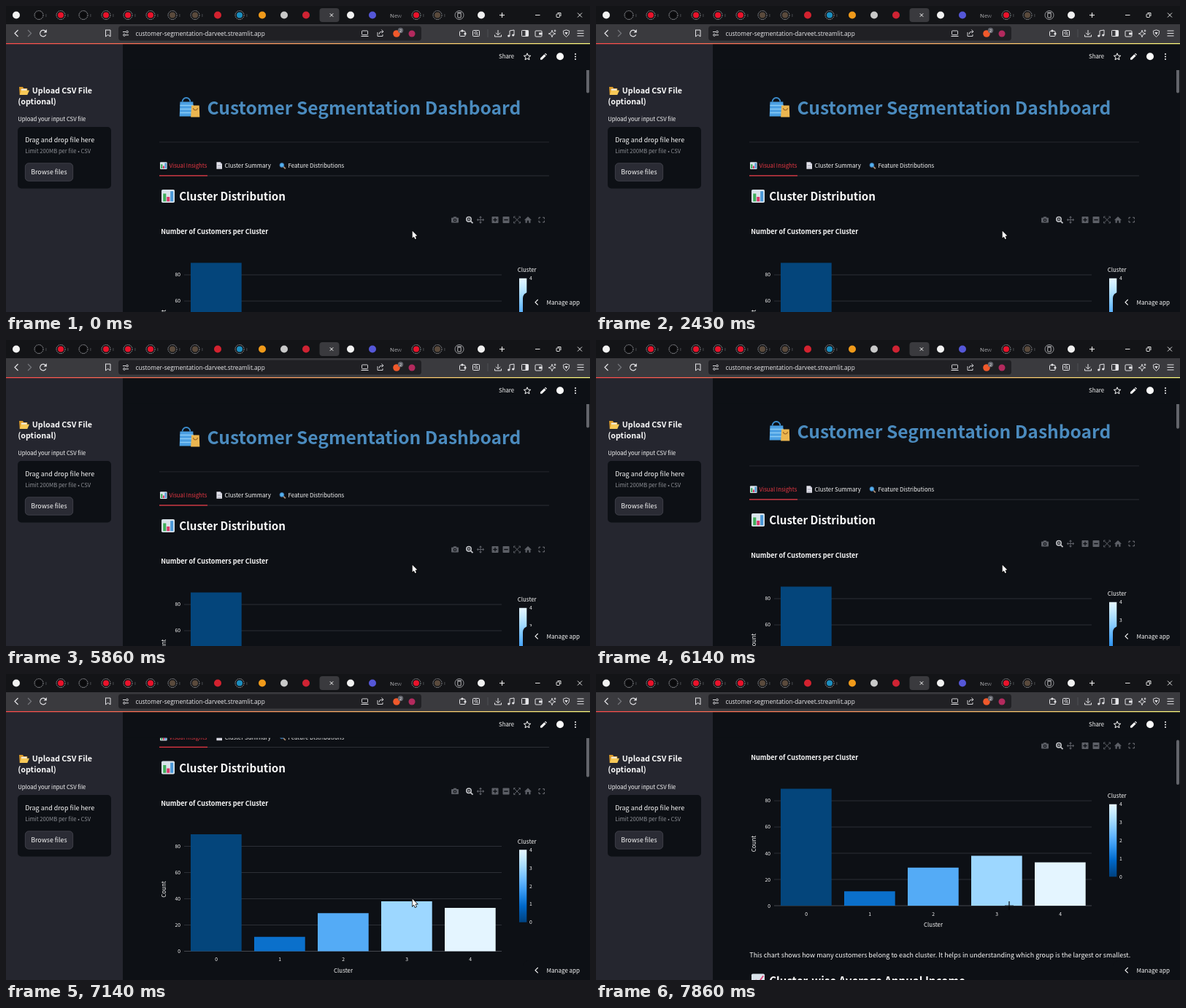
These frames come from a looping animation (800x420 px, 8 s). An HTML page with a canvas:

```html
<!DOCTYPE html>
<html lang="en">
<head>
<meta charset="utf-8">
<title>Customer Segmentation Dashboard</title>
<style>
html, body { margin: 0; width: 100%; height: 100%; overflow: hidden; background: #0d1015; }
canvas { display: block; width: 800px; height: 420px; }
</style>
</head>
<body>
<canvas id="stage"></canvas>
<script>
const LOOP = 8000;
const SANS = '"Noto Sans CJK JP", "Noto Sans CJK SC", "Noto Sans CJK", "Noto Sans", sans-serif';
const UI = '"Open Sans", "Noto Sans", sans-serif';
const BG = '#0d1015', SIDE = '#25262f', WHITE = '#fafafa', DIM = '#5c5f66', RED = '#ea3844';
const STRIP = '#131417', TOOLBAR = '#3a3a3e', FIELD = '#202024', GRID = '#2c2f36';
const BLUES = ['#004280', '#0054a3', '#0068c9', '#1c83e1', '#3d9df3', '#60b4ff', '#83c9ff', '#a6dcff', '#c7ebff', '#e4f5ff'];
const BARS = [[89, '#04457b'], [11, '#0b70cb'], [29, '#54abf6'], [38, '#9dd7ff'], [33, '#e4f5ff']];

// [start in ms, scroll in px]
const SCROLL = [[0, 0], [5710, 2], [5860, 6], [6000, 10], [6140, 14], [6290, 17], [6430, 19],
  [6710, 20], [7000, 77], [7140, 132.5], [7290, 143], [7860, 195]];

const stage = document.getElementById('stage');
const g = stage.getContext('2d');
const ratio = window.devicePixelRatio || 1;
stage.width = 800 * ratio;
stage.height = 420 * ratio;

function text(s, x, y, size, color = WHITE, weight = 400, align = 'left', font = SANS) {
  g.font = `${weight} ${size}px ${font}`;
  g.fillStyle = color;
  g.textAlign = align;
  g.fillText(s, x, y);
}
function rect(x, y, w, h, color, r = 0) {
  g.fillStyle = color;
  g.beginPath();
  g.roundRect(x, y, w, h, r);
  g.fill();
}
function frame(x, y, w, h, color, r = 0, lw = 1) {
  g.strokeStyle = color;
  g.lineWidth = lw;
  g.beginPath();
  g.roundRect(x, y, w, h, r);
  g.stroke();
}
function disc(x, y, r, color) {
  g.fillStyle = color;
  g.beginPath();
  g.arc(x, y, r, 0, 7);
  g.fill();
}
function arc(x, y, r, color, lw = 1, from = 0, to = Math.PI * 2) {
  g.strokeStyle = color;
  g.lineWidth = lw;
  g.beginPath();
  g.arc(x, y, r, from, to);
  g.stroke();
}
function path(pts) {
  g.beginPath();
  for (let i = 0; i < pts.length; i += 2) g.lineTo(pts[i], pts[i + 1]);
}
function line(pts, color, lw = 1) {
  path(pts);
  g.strokeStyle = color;
  g.lineWidth = lw;
  g.stroke();
}
function poly(pts, color) {
  path(pts);
  g.fillStyle = color;
  g.fill();
}
function at(x, y, scale, draw) {
  g.save();
  g.translate(x, y);
  g.scale(scale, scale);
  draw();
  g.restore();
}
function gradient(x0, y0, x1, y1, colors) {
  const fill = g.createLinearGradient(x0, y0, x1, y1);
  colors.forEach((c, i) => fill.addColorStop(i / (colors.length - 1), c));
  return fill;
}
function star(x, y, outer, inner, points) {
  const pts = [];
  for (let i = 0; i <= points * 2; i++) {
    const r = i % 2 ? inner : outer, a = i * Math.PI / points - Math.PI / 2;
    pts.push(x + r * Math.cos(a), y + r * Math.sin(a));
  }
  return pts;
}

// Emoji-like pictures on a 20 px grid
function barsPicture() {
  rect(0, 0, 20, 20, '#d9e3ea', 2);
  rect(2.5, 6, 4.5, 12, '#3fae5a');
  rect(8, 11, 4.5, 7, '#d83a6c');
  rect(13.5, 2.5, 4.5, 15.5, '#4a98d8');
}
function trendPicture() {
  rect(0, 0, 20, 20, '#d9e3ea', 2);
  line([2, 16, 7, 10, 11, 13, 18, 3], '#e0457b', 2);
}
function pagePicture() {
  poly([2, 0, 13, 0, 18, 5, 18, 20, 2, 20], '#e4e4ec');
  poly([13, 0, 18, 5, 13, 5], '#a9a9bd');
  for (const y of [8, 11, 14, 17]) rect(5, y, 10, 1, '#9a9aae');
}
function lensPicture() {
  line([12, 12, 19, 19], '#a98a70', 4);
  disc(8, 8, 6.5, '#54b1ee');
  arc(8, 8, 6.5, '#3a6ea5', 2);
}
function folderPicture() {
  poly([0, 2, 7, 2, 9, 5, 16, 5, 16, 17, 1, 17], '#dc9a28');
  rect(4, 6, 11, 6, '#f0eee4');
  poly([4, 9, 20, 9, 16, 18, 1, 18], '#f8c957');
}
function bagsPicture() {
  arc(7, 4.5, 3.8, '#3b8ccc', 1.3, Math.PI, 0);
  poly([1, 4.5, 13.5, 4.5, 14, 18.5, 0.5, 18.5], '#4a9fe2');
  for (const y of [7.5, 11, 14.5]) rect(1, y, 12.8, 1.1, '#8accf5');
  poly([12, 8, 19.4, 8, 19.8, 19.3, 11.3, 19.3], '#ebb650');
  arc(15.7, 10.5, 2, '#a06a24', 0.8, 0, Math.PI);
}

function tabs() {
  rect(0, 0, 800, 25, STRIP);
  rect(429.5, 3, 27, 19, TOOLBAR, 4);
  // centre, colour, sleeping
  const icons = [[14, '#f2f2f2', 0], [45, '#0a0a0c', 1], [75, '#e8132b', 1], [106, '#0a0a0c', 1], [137, '#e8132b', 1],
    [167, '#e8132b', 1], [198, '#e8132b', 1], [228, '#5a4a3c', 1], [259, '#5a4a3c', 1], [290, '#d3222f', 0],
    [320, '#1d8fc0', 1], [351, '#f09a1a', 0], [381, '#c9c9c9', 0], [411, '#cf2333', 0], [472, '#f2f2f2', 0],
    [502, '#5557d8', 0], [562, '#e8132b', 1], [591, '#5a4a3c', 1], [651, '#f0f0f0', 0]];
  for (const [x, color, asleep] of icons) {
    disc(x, 12.5, asleep ? 4 : 5, color);
    if (!asleep) continue;
    g.setLineDash([1.6, 0.8]);
    arc(x, 12.5, 6, '#a2a3a8', 0.9);
    g.setLineDash([]);
    rect(x + 9.5, 11, 0.8, 4, '#55575d');
  }
  arc(621, 12.5, 6, '#a2a3a8', 0.9);
  frame(618.8, 10, 4.4, 6, '#d0d0d2', 0.5, 0.9);
  line([618, 9, 624, 9], '#d0d0d2');
  text('New', 526, 15.5, 7.8, gradient(526, 0, 543, 0, ['#dddddf', '#5a5b60']), 400, 'left', UI);
  line([443.8, 10.3, 448.2, 14.7], WHITE);
  line([448.2, 10.3, 443.8, 14.7], WHITE);
  line([676, 12.5, 683, 12.5], WHITE);
  line([679.5, 9, 679.5, 16], WHITE);
  line([725, 12.5, 731.5, 12.5], WHITE, 0.9);
  frame(754, 11, 4.5, 4.5, WHITE, 0.8, 0.9);
  line([755.5, 9.5, 760, 9.5, 760, 14], WHITE, 0.9);
  line([783, 9.5, 789, 15.5], WHITE, 0.9);
  line([789, 9.5, 783, 15.5], WHITE, 0.9);
}

function toolbar() {
  const c = '#e4e4e7';
  rect(0, 25, 800, 27, TOOLBAR);
  rect(154, 27.5, 415, 20, FIELD, 4);
  line([16.5, 33, 12, 37.5, 16.5, 42], c, 1.2);
  line([30, 33, 34.5, 37.5, 30, 42], '#77787d', 1.2);
  arc(51, 37.5, 4.3, c, 1.2, 0.5, 5.6);
  poly([55.8, 32, 55.8, 36.4, 51.6, 36.4], c);
  line([136.5, 33, 143, 33, 143, 42, 139.7, 39.5, 136.5, 42, 136.5, 32.6], c);
  line([160, 35.5, 164, 35.5], c);
  arc(166, 35.5, 1.4, c, 0.9);
  line([164, 39.8, 168, 39.8], c);
  arc(162, 39.8, 1.4, c, 0.9);
  text('customer-segmentation-darveet.streamlit.app', 177.5, 40.8, 8.25, '#ececef', 400, 'left', UI);
  frame(487.5, 34, 8, 5.5, c, 0.8, 0.9);
  line([486.5, 41.5, 496.5, 41.5], c);
  line([509, 36, 509, 41.5, 516, 41.5, 516, 39], c, 0.9);
  line([511, 39, 512, 36, 516.5, 35], c, 0.9);
  line([514.3, 32.7, 517, 35, 514.8, 37.4], c, 0.9);
  disc(535, 38, 4.8, '#f0592b');
  disc(540.5, 33.5, 3.7, '#63656d');
  text('2', 540.5, 35.6, 5.5, WHITE, 400, 'center', UI);
  disc(556, 38, 4.5, '#b32a5e');
  frame(621.5, 34.5, 7.5, 7, c, 1);
  disc(625, 34, 1.6, c);
  disc(629, 38, 1.6, c);
  frame(639.5, 33.5, 9, 8, c, 1);
  arc(643.7, 37, 1.7, c, 0.9);
  line([645, 38.3, 646.7, 40], c);
  line([660, 32, 660, 43], '#55565b', 0.8);
  line([674, 33, 674, 39.5], c);
  line([671, 36.8, 674, 39.8, 677, 36.8], c);
  line([669.5, 39.5, 669.5, 42, 678.5, 42, 678.5, 39.5], c);
  line([690, 41, 690, 34, 696, 33, 696, 40], c);
  disc(688.7, 41, 1.6, c);
  disc(694.7, 40, 1.6, c);
  frame(706.5, 33.5, 9, 8, c, 0.8);
  rect(711.5, 33.5, 4, 8, c);
  frame(725, 34, 9, 8, c, 1);
  rect(730, 36.5, 4.5, 3, c, 0.8);
  line(star(748, 38, 4.8, 1.8, 4), c, 0.9);
  poly(star(752, 34, 2.2, 0.8, 4), c);
  line([767.5, 32.8, 771.7, 34.2, 771, 39, 767.5, 42.5, 764, 39, 763.3, 34.2, 767.5, 32.8], c, 0.9);
  poly([765.3, 36, 769.7, 36, 767.5, 39.5], c);
  for (const y of [34, 37.5, 41]) line([782.5, y, 791.5, y], c);
}

function sidebar() {
  rect(0, 52, 160, 368, SIDE);
  at(18, 109.5, 0.7, folderPicture);
  text('Upload CSV File', 35.7, 120, 10.75, WHITE, 600);
  text('(optional)', 16.2, 135, 10.75, WHITE, 600);
  text('Upload your input CSV file', 16.2, 158, 7.7);
  rect(16, 166, 128, 84.5, BG, 5);
  text('Drag and drop file here', 26.2, 187, 8.95);
  text('Limit 200MB per file • CSV', 26.2, 202, 7.65, '#8e9096');
  rect(26, 215.5, 66, 25, '#2a2b34', 5);
  frame(26.3, 215.8, 65.4, 24.4, '#46474f', 5, 0.7);
  text('Browse files', 34.2, 231, 8.85);
}

function header() {
  rect(160, 52, 640, 35.5, BG);
  text('Share', 675, 72.2, 7.85);
  line(star(714, 69.8, 5, 2.2, 5), WHITE, 1);
  poly([732, 73.8, 732, 71.6, 737.4, 66.2, 739.6, 68.4, 734.2, 73.8], WHITE);
  poly([738, 65.6, 739, 64.8, 741, 66.8, 740.2, 67.8], WHITE);
  disc(759, 69.3, 5, WHITE);
  for (const y of [66, 69.5, 73]) disc(780, y, 1, WHITE);
}

function modebar(y) {
  rect(610, y - 3, 10, 7, DIM, 1);
  rect(613, y - 4.3, 4, 2, DIM);
  disc(615, y + 0.4, 2.2, BG);
  disc(615, y + 0.4, 1.2, DIM);
  arc(634, y - 0.7, 3.2, '#c4c6ca', 1.5);
  line([636.3, y + 1.6, 639.5, y + 4.6], '#c4c6ca', 1.8);
  line([632.3, y - 0.7, 635.7, y - 0.7], '#c4c6ca', 0.9);
  line([634, y - 2.4, 634, y + 1], '#c4c6ca', 0.9);
  line([645.5, y, 654.5, y], DIM);
  line([650, y - 4.5, 650, y + 4.5], DIM);
  for (let i = 0; i < 4; i++) {
    g.save();
    g.translate(650, y);
    g.rotate(i * Math.PI / 2);
    poly([-2, -3, 0, -5.2, 2, -3], DIM);
    g.restore();
  }
  for (const x of [670, 685]) {
    rect(x - 4.5, y - 4.5, 9, 9, DIM, 0.8);
    line([x - 2.7, y, x + 2.7, y], BG, 1.3);
  }
  line([670, y - 2.7, 670, y + 2.7], BG, 1.3);
  line([696, y - 4, 704, y + 4], DIM);
  line([704, y - 4, 696, y + 4], DIM);
  for (const sx of [-1, 1]) for (const sy of [-1, 1]) {
    const x = 700 + sx * 4.5, cy = y + sy * 4.5;
    line([x - sx * 2.2, cy, x, cy, x, cy - sy * 2.2], DIM, 0.9);
    const fx = 733.7 + sx * 3.7, fy = y + sy * 3.3;
    line([fx - sx * 2.2, fy, fx, fy, fx, fy - sy * 2.2], '#74767c', 1);
  }
  poly([710, y + 0.3, 715, y - 4.5, 720, y + 0.3, 718.5, y + 0.3, 718.5, y + 4.2, 716.2, y + 4.2, 716.2, y + 1,
    713.8, y + 1, 713.8, y + 4.2, 711.5, y + 4.2, 711.5, y + 0.3], DIM);
}

function chart() {
  const zero = 513, unit = 1.802;
  text('Number of Customers per Cluster', 212.3, 313, 9, WHITE, 600);
  for (let v = 0; v <= 80; v += 20) {
    const y = zero - v * unit;
    rect(244, Math.round(y) - 0.4, 435, 0.8, v ? GRID : '#44474e');
    text(v, 239, y + 2.6, 6.75, WHITE, 400, 'right');
  }
  BARS.forEach(([v, color], i) => {
    const x = 253 + 87 * i;
    rect(x, zero - v * unit, 69.7, v * unit, color);
    text(i, x + 35, 526.5, 6.75, WHITE, 400, 'center');
    text(i, 717, 475.6 - 24.8 * i, 6.75);
  });
  text('Cluster', 462, 542, 7.9, WHITE, 400, 'center');
  g.save();
  g.translate(219, 428);
  g.rotate(-Math.PI / 2);
  text('Count', 0, 0, 7.9, WHITE, 400, 'center');
  g.restore();
  text('Cluster', 700.8, 365, 7.9);
  rect(703, 373.7, 10.3, 99.6, gradient(0, 473, 0, 374, BLUES));
}

function page(scroll) {
  g.save();
  g.beginPath();
  g.rect(160, 87.5, 640, 332.5);
  g.clip();
  g.translate(0, -scroll);
  at(237, 125, 1.43, bagsPicture);
  text('Customer Segmentation Dashboard', 275.5, 148.7, 24.55, '#4b8bbe', 700);
  rect(210, 186.4, 534, 0.8, GRID);

  at(211, 214.3, 0.48, barsPicture);
  text('Visual Insights', 223.5, 222, 7.8, RED);
  at(287.5, 214.3, 0.47, pagePicture);
  text('Cluster Summary', 299.5, 222, 7.85);
  at(374.3, 214.8, 0.45, lensPicture);
  text('Feature Distributions', 386.5, 222, 7.85);
  rect(210, 232.6, 534, 0.8, GRID);
  rect(210, 232.3, 66, 1.2, RED);

  at(213, 252, 0.9, barsPicture);
  text('Cluster Distribution', 237.2, 267, 15.1, WHITE, 600);
  modebar(293.5);
  chart();
  text('This chart shows how many customers belong to each cluster. It helps in understanding which group is the largest or smallest.',
    210.3, 584, 8.98);
  at(213, 606.5, 0.9, trendPicture);
  text('Cluster-wise Average Annual Income', 237.2, 621.5, 15.1, WHITE, 600);
  g.restore();
}

function overlay(scroll) {
  g.save();
  g.beginPath();
  g.rect(790, 88, 10, 332);
  g.clip();
  rect(795, 58 + scroll / 6, 4, 61.5, '#63656b', 2);
  g.restore();
  rect(708, 393, 100, 40, BG, 8);
  line([728.7, 403, 725, 406.7, 728.7, 410.4], WHITE, 1.1);
  text('Manage app', 740.6, 409.8, 8);
}

function pointer(t) {
  if (t >= 7860) {
    line([566, 312, 566, 324], '#000', 1.2);
    line([560, 318, 572, 318], '#1a1c20', 0.9);
    return;
  }
  const arrow = [556.7, 308.7, 556.7, 318.4, 558.8, 316.4, 560.4, 320, 562, 319.3, 560.5, 315.8, 563.4, 315.6, 556.7, 308.7];
  line(arrow, '#000', 1.4);
  poly(arrow, '#fff');
}

function draw(t) {
  const scroll = SCROLL.filter(step => step[0] <= t).pop()[1];
  g.setTransform(ratio, 0, 0, ratio, 0, 0);
  rect(0, 0, 800, 420, BG);
  page(scroll);
  header();
  sidebar();
  tabs();
  toolbar();
  rect(0, 51, 800, 1.2, gradient(0, 0, 800, 0, ['#ff4b4b', '#fffd80']));
  overlay(scroll);
  pointer(t);
}

function tick() {
  draw(performance.now() % LOOP);
  requestAnimationFrame(tick);
}
tick();
</script>
</body>
</html>
```
